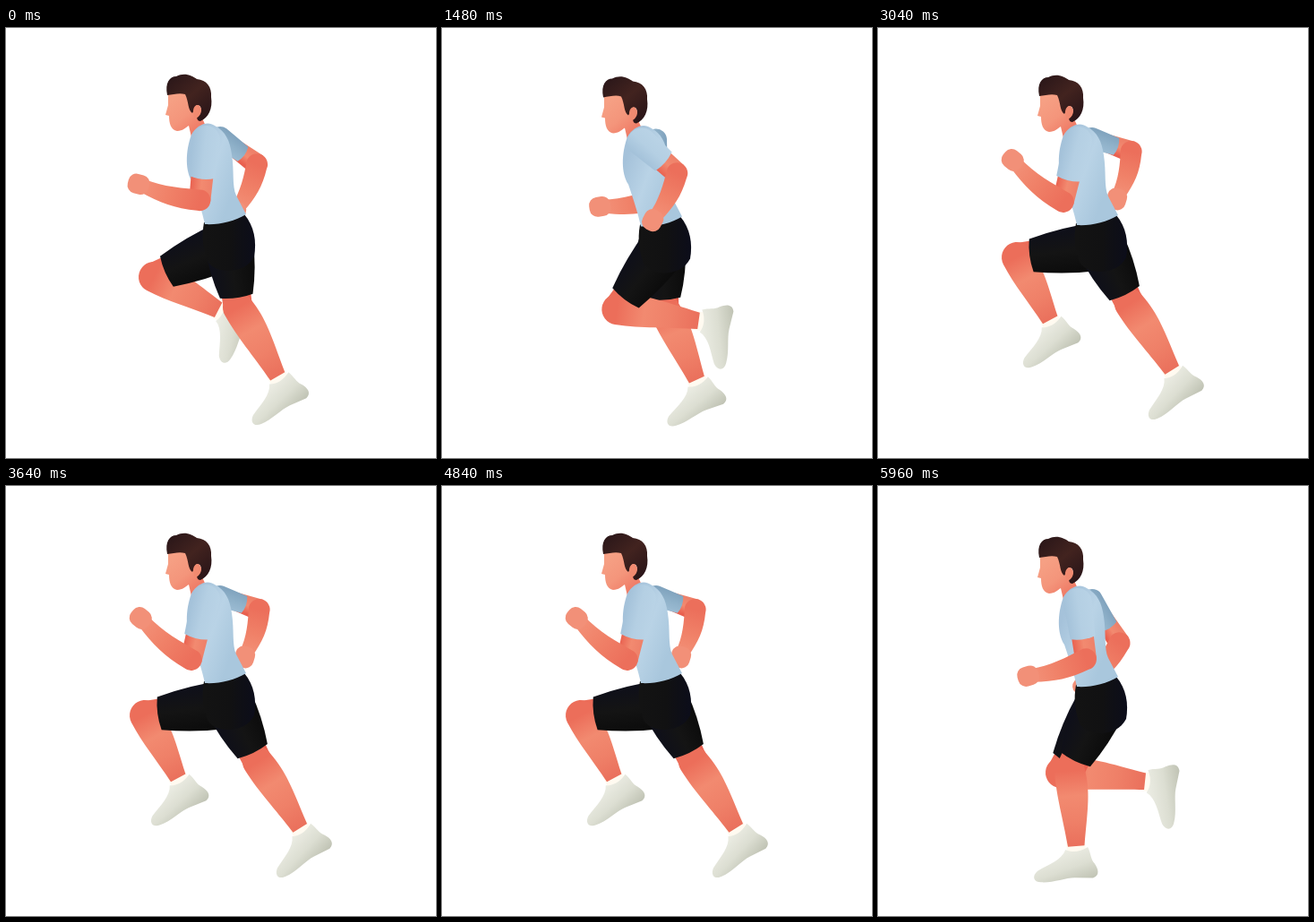
Write an HTML page with a canvas that moves like this. It is 480 px wide and 480 px high and loops after 6 s.

```html
<!DOCTYPE html>
<html lang="en">
<head>
<meta charset="utf-8">
<title>Runner</title>
<style>
  html, body { margin: 0; width: 100%; height: 100%; overflow: hidden; background: #fff; }
  canvas { display: block; width: 480px; height: 480px; }
</style>
</head>
<body>
<canvas id="stage" width="480" height="480"></canvas>
<script>
const STRIDE = 600, STEP = 40, SIZE = 480, TURN = Math.PI * 2;
const FAR_LEG_LAG = 290, FAR_ARM_LAG = 310;

// Key moments of one leg: time, knee x y, ankle x y
const legKeys = [
  [0, 259, 312, 303, 389],   // push
  [40, 281, 308, 328, 382],  // toe off
  [130, 284, 306, 380, 335], // trail
  [270, 204, 320, 298, 330], // fold
  [310, 165, 278, 237, 315], // drive
  [350, 155, 256, 192, 326], // knee high
  [410, 153, 266, 150, 356], // reach
  [560, 214, 318, 221, 402]  // support
];

const SKIN = ['#e9604f', '#f28a70', '#ee8069'];
const SHORTS = ['#0e0f1a', '#141414', '#0b0b0b'];
const SHOE = ['#ebece3', '#dcded2', '#bfc2b3'];
const NEAR_CLOTH = ['#a3c1d9', '#b4cfe3', '#b9d3e6'];
const FAR_CLOTH = ['#9dbdd4', '#8fb1c9', '#7fa2bd'];

const face = new Path2D('M181 72L181 86L178 97L182 98C182 106 184 114 191 115C197 115 201 111 204 109L207 122L224 112L217 96L214 72Z');
const ear = new Path2D('M209 92C210 84 218 85 218 92C218 97 213 102 210 100Z');
const hair = new Path2D('M180 75C177 61 183 54 190 54C199 49 208 53 213 57C224 58 230 66 229 77C231 90 226 100 217 104C213 104 212 99 215 97C220 91 217 85 213 86C210 87 210 93 208 95C203 92 204 82 200 74C194 72 187 74 180 75Z');
const shirt = new Path2D('M207 119C213 108 225 103 233 109C245 115 250 126 252 141C255 160 252 176 257 187L268 208C255 216 237 220 222 219C219 205 214 190 208 172C200 160 200 138 207 119Z');
const pelvis = new Path2D('M221 217L266 208C277 221 280 238 277 255C267 275 236 275 226 262C220 248 218 234 221 217Z');
const shoe = new Path2D('M-12 3C-17 14 -32 18 -45 24C-52 29 -51 36 -42 37C-30 39 -14 34 -4 35L16 37C24 35 23 28 19 21C15 16 16 9 13 2C4 7 -5 7 -12 3Z');

const ctx = document.getElementById('stage').getContext('2d');

// Smooth cyclic curve through the keys
function pose(keys, time) {
  const n = keys.length, t = (time + STRIDE) % STRIDE;
  let i = n - 1;
  while (keys[i][0] > t) i--;
  const key = j => keys[(j + n) % n];
  const at = j => key(j)[0] + STRIDE * Math.floor(j / n);
  const span = at(i + 1) - at(i), u = (t - at(i)) / span;
  const slope = (j, c) => (key(j + 1)[c] - key(j - 1)[c]) / (at(j + 1) - at(j - 1)) * span;
  return key(i).slice(1).map((a, k) => {
    const c = k + 1, b = key(i + 1)[c], m = slope(i, c), w = slope(i + 1, c);
    return a + u * (m + u * (3 * (b - a) - 2 * m - w + u * (2 * (a - b) + m + w)));
  });
}

// The body rises and dips twice per stride
function bobAt(time) {
  const x = time / STRIDE * TURN * 2;
  return 4 * (Math.cos(x) - Math.cos(2 * x)) - 2 * Math.sin(2 * x);
}

const mix = (p, q, k) => [p[0] + (q[0] - p[0]) * k, p[1] + (q[1] - p[1]) * k];

// Point at a distance from p, turned from straight down towards the back
function hang(p, degrees, length) {
  const a = degrees * TURN / 360;
  return [p[0] + Math.sin(a) * length, p[1] + Math.cos(a) * length];
}

function shade(colors, x0, y0, x1, y1) {
  const g = ctx.createLinearGradient(x0, y0, x1, y1);
  colors.forEach((c, i) => g.addColorStop(i / (colors.length - 1), c));
  return g;
}

function paint(path, fill) {
  ctx.fillStyle = fill;
  ctx.fill(path);
}

// Runs draw(length) with the x axis laid from p to q
function along(p, q, draw) {
  const dx = q[0] - p[0], dy = q[1] - p[1];
  ctx.save();
  ctx.translate(p[0], p[1]);
  ctx.rotate(Math.atan2(dy, dx));
  draw(Math.hypot(dx, dy));
  ctx.restore();
}

// Limb segment: round start, end width r2, sides swelling by belly
function segment(p, q, r1, r2, colors, belly = 0) {
  along(p, q, len => {
    const mid = (r1 + r2) / 2 + belly;
    const path = new Path2D();
    path.arc(0, 0, r1, TURN / 4, TURN * 3 / 4);
    path.quadraticCurveTo(len / 2, -mid, len, -r2);
    path.quadraticCurveTo(len + 4, 0, len, r2);
    path.quadraticCurveTo(len / 2, mid, 0, r1);
    paint(path, shade(colors, 0, r1, 0, -r1));
  });
}

function drawShank(knee, ankle) {
  along(knee, ankle, len => {
    ctx.fillStyle = '#fffaf0';
    ctx.fillRect(len - 6, -10.5, 15, 21);
    const path = new Path2D();
    path.arc(0, 0, 17, TURN / 4, TURN * 3 / 4);
    path.bezierCurveTo(len * .3, -21, len * .5, -17, len, -9.5);
    path.lineTo(len, 9);
    path.bezierCurveTo(len * .6, 12, len * .35, 17, 0, 17);
    paint(path, shade(['#ec6e5a', '#f28a70', '#ef8068', '#ea705c'], 0, 0, len, 0));

    // The foot keeps a right angle to the shin
    ctx.translate(len, 0);
    ctx.rotate(-TURN / 4);
    paint(shoe, shade(SHOE, -10, 4, 0, 42));
  });
}

function drawLeg(time, hip) {
  const [kx, ky, ax, ay] = pose(legKeys, time);
  const knee = [kx, ky];
  segment(hip, knee, 18, 16, ['#ec6e5a', '#ea6653', '#e9604f']);
  drawShank(knee, [ax, ay]);
  segment(hip, mix(hip, knee, .82), 27, 18.5, SHORTS, 4);
}

function drawForearm(elbow, fist) {
  along(elbow, fist, len => {
    const path = new Path2D();
    path.arc(0, 0, 12, TURN / 4, TURN * 3 / 4);
    path.bezierCurveTo(len * .35, -16, len * .6, -14, len - 4, -8);
    path.lineTo(len - 4, 7);
    path.bezierCurveTo(len * .6, 4, len * .3, 8, 0, 12);
    paint(path, shade(['#ec6f5b', '#f08168', '#f3937a'], 0, 0, len, 0));
    const hand = new Path2D();
    hand.roundRect(len - 12, -11, 24, 22, 9);
    paint(hand, '#f29078');
  });
}

// w runs from -1 (arm fully back) to 1 (arm fully forward)
function drawArm(time, shoulder, cloth, r) {
  const w = Math.cos((time - 80) / STRIDE * TURN);
  const swing = 22 - 48 * w + 10 * w * w;
  const bend = 52 + 62 * w + 25 * w * w;
  const elbow = hang(shoulder, swing, 66 - .28 * swing);
  segment(shoulder, elbow, r - 3, 12, SKIN);
  drawForearm(elbow, hang(elbow, -bend, 64 + 10 * w));
  segment(shoulder, mix(shoulder, elbow, .62), r, r - 2, cloth);
}

function drawHead() {
  paint(face, shade(['#f6a084', '#f4957b', '#ee7662'], 184, 80, 214, 118));
  paint(hair, shade(['#2b1719', '#42231f', '#2a1518'], 184, 54, 224, 100));
  paint(ear, '#f18a70');
}

function drawRunner(time) {
  const bob = bobAt(time);
  ctx.fillStyle = '#fff';
  ctx.fillRect(0, 0, SIZE, SIZE);
  drawArm(time - FAR_ARM_LAG, [239, 122 + bob], FAR_CLOTH, 12);
  drawLeg(time - FAR_LEG_LAG, [245, 243 + bob]);
  drawLeg(time, [249, 241 + bob]);
  ctx.save();
  ctx.translate(0, bob);
  paint(pelvis, shade(['#131313', '#111112', '#0c0d1a'], 222, 240, 278, 240));
  drawHead();
  paint(shirt, shade(['#a5c2da', '#b9d3e6', '#a9c7dd'], 203, 150, 258, 170));
  ctx.restore();
  drawArm(time, [223, 125 + bob], NEAR_CLOTH, 16);
}

const start = performance.now();
function tick() {
  const clock = performance.now() - start;
  drawRunner(Math.floor(clock / STEP) * STEP % STRIDE);
  requestAnimationFrame(tick);
}
tick();
</script>
</body>
</html>
```
